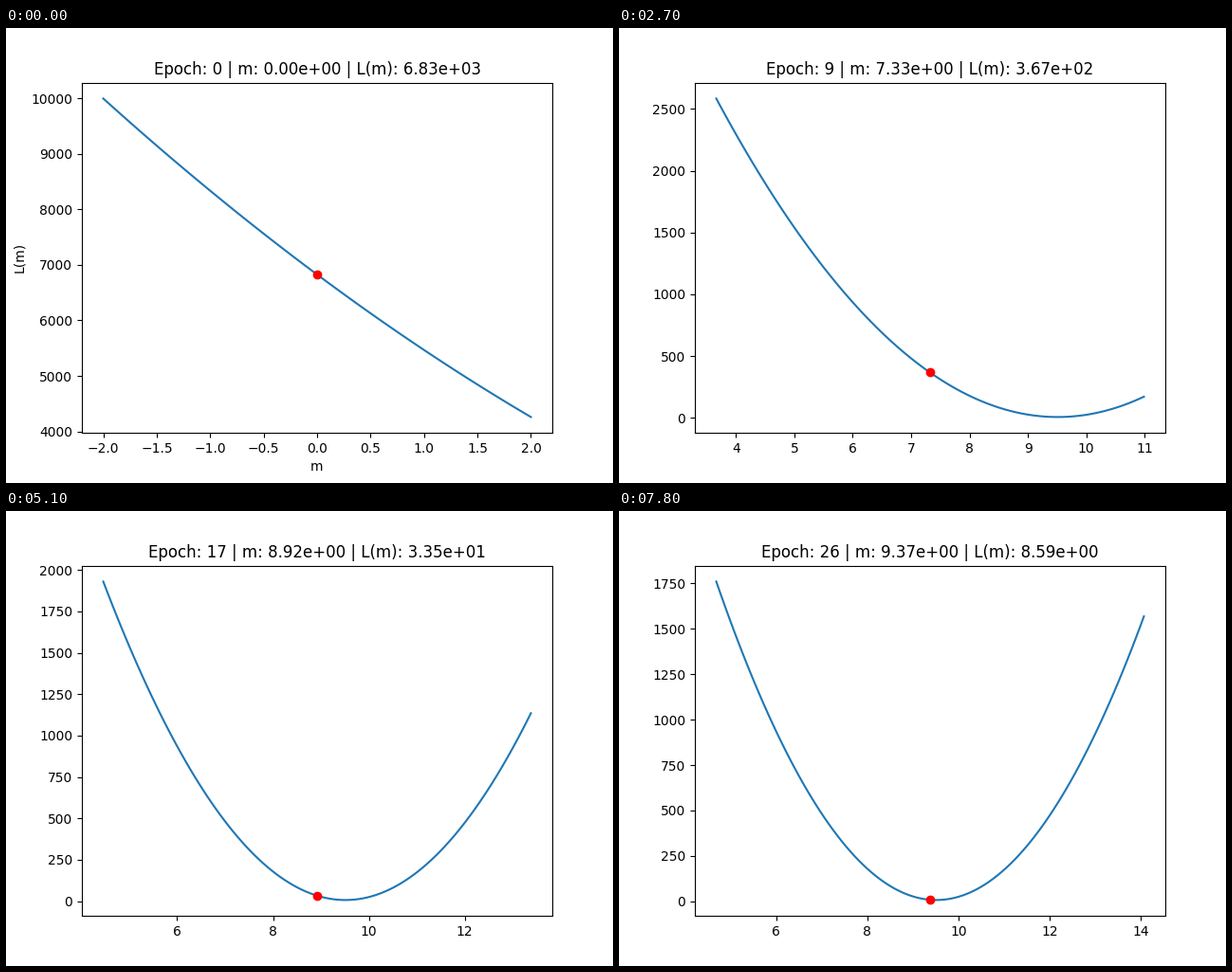
Recreate the animation shown at these times as a matplotlib script. Size 640x480 px, loop 8 s.

```python
import numpy as np
import matplotlib.pyplot as plt
from matplotlib.animation import FuncAnimation

# Quadratic loss: curvature, best slope and remaining error
CURVATURE, BEST, FLOOR = 75.383, 9.5105, 7.2
LEARNING_RATE = 0.001
TICK_MS, TICKS_PER_EPOCH, TICKS = 100, 3, 80


def loss(m):
    return CURVATURE * (m - BEST) ** 2 + FLOOR


def slope_at(epoch):
    """Gradient descent from zero, in closed form."""
    return BEST * (1 - (1 - 2 * CURVATURE * LEARNING_RATE) ** epoch)


fig, ax = plt.subplots(figsize=(6.4, 4.8), dpi=100)


def update(tick):
    epoch = tick // TICKS_PER_EPOCH
    m = slope_at(epoch)
    xs = np.linspace(m / 2, m * 1.5, 100) if epoch else np.linspace(-2, 2, 100)

    ax.clear()
    ax.plot(xs, loss(xs))
    ax.plot(m, loss(m), "ro")
    ax.set_title(f"Epoch: {epoch} | m: {m:.2e} | L(m): {loss(m):.2e}")
    if epoch == 0:
        ax.set_xlabel("m")
        ax.set_ylabel("L(m)")


anim = FuncAnimation(fig, update, frames=TICKS, interval=TICK_MS,
                     init_func=lambda: update(0), repeat=True, repeat_delay=0)
plt.show()
```
